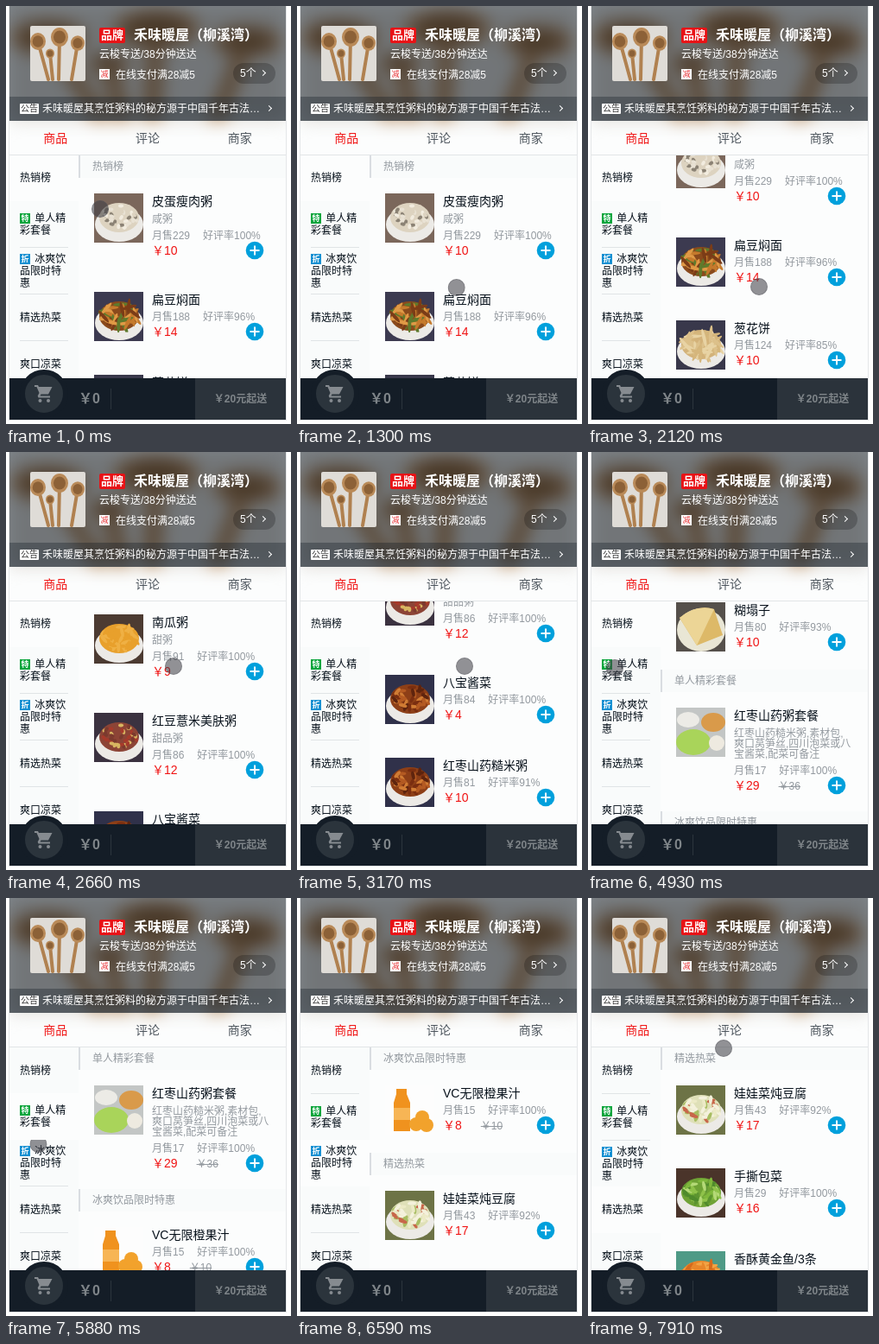
These frames come from a looping animation (330x484 px, 8000 ms). An HTML page:

```html
<!DOCTYPE html>
<html lang="zh-CN">
<head>
<meta charset="utf-8">
<title>外卖点餐</title>
<style>
* { box-sizing: border-box; margin: 0; padding: 0; }
html, body { width: 100%; height: 100%; overflow: hidden; background: #fff; }
body { font: 12px/14px "Liberation Sans", "Noto Sans CJK SC", "Noto Sans CJK", sans-serif; color: #07111b; }
#stage { position: relative; width: 330px; height: 484px; overflow: hidden; }
#stage > *, .at { position: absolute; white-space: nowrap; }
svg { display: block; }

.frame { left: 3px; top: 0; width: 322px; height: 480px; border: 1px solid #e4e6e8; border-top: 0; background: #fcfdfd; }
.backdrop { left: 4px; top: 0; width: 320px; height: 172px; overflow: hidden; }
.backdrop svg { position: absolute; top: -1px; width: 320px; height: 134px; filter: blur(10px); }
.header { left: 4px; top: 0; width: 320px; height: 133px; color: #fff; background: rgba(7,17,27,.5); }
.brand { left: 104px; top: 25px; width: 30px; height: 18px; line-height: 18px; border-radius: 2px; background: #e81216; font-size: 13px; font-weight: 700; text-align: center; }
.shop { left: 144px; top: 25px; font-size: 16px; line-height: 18px; font-weight: 700; }
.cut { left: 104px; top: 73px; width: 12px; height: 12px; background: #fff; color: #e8393c; font-size: 9px; line-height: 12px; text-align: center; }
.pill { left: 259px; top: 66px; width: 49px; height: 24px; border-radius: 12px; background: rgba(0,0,0,.22); line-height: 24px; padding-left: 8px; }
.notice { left: 0; top: 105px; width: 320px; height: 28px; line-height: 28px; background: rgba(7,17,27,.3); padding-left: 38px; }
.label { left: 12px; top: 8px; width: 22px; height: 12px; background: #fff; color: #333; font-size: 10px; line-height: 12px; text-align: center; border-radius: 1px; }
.arrow { width: 5px; height: 5px; border: solid #fff; border-width: 1.5px 1.5px 0 0; transform: rotate(45deg); }

.tabs { left: 4px; top: 133px; width: 320px; height: 40px; display: flex; border-bottom: 1px solid #e2e5e7; font-size: 14px; line-height: 40px; color: #4d555d; text-align: center; }
.tabs b { flex: 1; font-weight: 400; }
.tabs b:first-child { color: #f01414; }

.goods { left: 4px; top: 173px; width: 320px; height: 258px; overflow: hidden; }
.menu { left: 0; top: 0; width: 80px; height: 258px; background: #f9fbfb; }
.menu div { position: relative; height: 54px; padding: 0 12px; display: flex; align-items: center; white-space: normal; }
.menu div::after { content: ""; position: absolute; left: 12px; bottom: 0; width: 56px; height: 1px; background: #e0e4e6; }
.menu .on { margin-top: -1px; background: #fcfdfd; z-index: 1; }
.menu .on::after { display: none; }
.menu i { display: inline-block; width: 12px; height: 12px; margin: 1px 2px 0 0; vertical-align: top; color: #fff; font: 700 9px/12px "Noto Sans CJK SC", "Noto Sans CJK", sans-serif; text-align: center; }
.list { left: 80px; top: 0; width: 240px; }
.list h2 { height: 26px; padding-left: 14px; border-left: 2px solid #d9dde1; background: #f9fbfb; font-size: 12px; line-height: 26px; font-weight: 400; color: #93999f; }
.food { position: relative; margin: 18px; min-height: 60px; padding-left: 67px; white-space: normal; display: flow-root; }
.food + .food { margin-top: 36px; }
.pic { position: absolute; left: 0; top: 0; }
.food h3 { margin: 2px 0 8px; font-size: 14px; line-height: 14px; font-weight: 400; white-space: nowrap; }
.food p { color: #93999f; line-height: 12px; }
.food .desc { margin-bottom: 8px; }
.food .sold { line-height: 10px; white-space: nowrap; }
.sold span { margin-left: 15px; }
.price { position: relative; height: 24px; line-height: 24px; font-size: 14px; color: #f01414; }
.price s { margin-left: 22px; font-size: 12px; color: #93999f; }
.plus { position: absolute; right: 7px; top: 1px; }

.cart { left: 4px; top: 431px; width: 320px; height: 48px; background: #141d27; color: #7f8589; font-weight: 700; }
.ring { left: 12px; top: -10px; width: 56px; height: 56px; border-radius: 50%; background: #2b343c; border: 6px solid #141d27; }
.total { left: 80px; top: 12px; height: 24px; line-height: 24px; font-size: 16px; }
.bar { left: 117px; top: 12px; width: 1px; height: 24px; background: #2c353d; }
.pay { left: 215px; top: 0; width: 105px; height: 48px; line-height: 48px; background: #2b333b; text-align: center; }
#dot { left: -10px; top: -10px; width: 20px; height: 20px; border-radius: 50%; background: rgba(62,62,68,.56); border: 1px solid rgba(90,90,96,.35); }
</style>
</head>
<body>
<div id="stage">
  <div class="frame"></div>
  <div class="backdrop"><svg class="spoons" viewBox="0 0 64 64" preserveAspectRatio="none"></svg></div>
  <div class="header">
    <svg class="at spoons" style="left:24px;top:23px;border-radius:2px" width="64" height="64"></svg>
    <div class="at brand">品牌</div>
    <div class="at shop">禾味暖屋（柳溪湾）</div>
    <div class="at" style="left:104px;top:49px">云梭专送/38分钟送达</div>
    <div class="at cut">减</div>
    <div class="at" style="left:123px;top:73px">在线支付满28减5</div>
    <div class="at pill">5个<span class="at arrow" style="left:32px;top:9px"></span></div>
    <div class="at notice"><span class="at label">公告</span>禾味暖屋其烹饪粥料的秘方源于中国千年古法…<span class="at arrow" style="left:298px;top:11px"></span></div>
  </div>
  <div class="tabs"><b>商品</b><b>评论</b><b>商家</b></div>
  <div class="goods">
    <div class="at menu" id="menu"></div>
    <div class="at list" id="list"></div>
  </div>
  <div class="cart">
    <div class="at ring"><svg style="margin:10px" width="24" height="24" fill="#868b90"><path d="M1 2h4l1 2h15.500l-4.500 8.500H8.500l-1 2H19v2H5.500l-.8-2L6.500 11 3.500 4H1z"/><circle cx="7.500" cy="20" r="2"/><circle cx="17" cy="20" r="2"/></svg></div>
    <div class="at total">￥0</div>
    <div class="at bar"></div>
    <div class="at pay">￥20元起送</div>
  </div>
  <div id="dot"></div>
</div>
<script>
const byId = id => document.getElementById(id);
const ellipse = (x, y, rx, ry, fill, turn = 0) =>
  `<ellipse cx="${x}" cy="${y}" rx="${rx}" ry="${ry}" fill="${fill}" transform="rotate(${turn} ${x} ${y})"/>`;
const shape = (d, fill) => `<path d="${d}" fill="${fill}"/>`;

function seeded(seed) {
  return () => (seed = (seed * 16807) % 2147483647) / 2147483647;
}

// Pieces of food scattered over the mound in a bowl.
function scatter(long, colors) {
  const rnd = seeded(4242);
  return Array.from({ length: 40 }, (_, i) => {
    const a = rnd() * Math.PI * 2, r = Math.sqrt(rnd());
    return ellipse(29 + Math.cos(a) * r * 20, 28 + Math.sin(a) * r * 14, long, 2, colors[i % colors.length], rnd() * 180);
  }).join('');
}

const dish = (back, base, long, ...colors) =>
  [back, ellipse(29, 36, 28, 20, '#eceae6') + ellipse(29, 28, 23, 17, base) + scatter(long, colors)];
const stew = dish('#30314a', '#8d3f17', 5, '#b45a22', '#7a2e10', '#d07c34', '#5e240e');

const pics = {
  congee: dish('#7b675b', '#ddd3c0', 3, '#e9e2d4', '#f2ecdf', '#8b8274', '#ddd3c0'),
  noodles: dish('#3c3a50', '#8a4a1c', 9, '#c57a2c', '#5f7a2c', '#e09a46', '#7b3c17'),
  pancake: dish('#39384b', '#d3b27a', 11, '#e8d3a4', '#d5b67c', '#dcc08a'),
  pie: dish('#4a3d38', '#c08a45', 11, '#d5a35c', '#b57a38'),
  pumpkin: dish('#4c3b32', '#e8a02c', 6, '#e8a02c', '#efb044'),
  redbean: dish('#3b3240', '#8c4436', 3, '#a63a2b', '#d8b661', '#7b3a2e'),
  stew,
  folded: ['#55504b', ellipse(29, 32, 28, 25, '#e9e6d5') + shape('M4 18Q24 2 44 8L54 38 24 50z', '#ddb968') +
    shape('M4 18Q24 2 44 8L24 50z', '#ecd596')],
  combo: ['#c3c6c5', ellipse(14, 14, 13, 9, '#ecebe6') + ellipse(43, 17, 14, 11, '#d99a4a') +
    ellipse(20, 40, 20, 15, '#a9d45a') + ellipse(47, 41, 9, 9, '#eeeae0')],
  juice: ['#fdfdfd', shape('M13 4h12v6l4 10v33H10V20l3-10z', '#f0921e') + shape('M10 26h19v14H10z', '#f7b555') +
    [[36, 45], [48, 46], [43, 37]].map(([x, y]) => ellipse(x, y, 8, 8, '#f2a22c')).join('')],
  tofu: dish('#6d7346', '#dfe0b8', 5, '#f4f1dc', '#a8bd62', '#eceac6', '#f4f1dc', '#c8674a'),
  cabbage: dish('#4a342a', '#6fa235', 6, '#8fc24a', '#5c9430', '#b4d977', '#7fb83c', '#4f8a2c'),
  fish: dish('#4f9a86', '#e8862a', 8, '#e8862a', '#f2a445', '#d56a1c')
};

// name, picture, price, sold, rating, old price, description
const sections = [
  ['热销榜', [
    ['皮蛋瘦肉粥', 'congee', 10, 229, 100, 0, '咸粥'],
    ['扁豆焖面', 'noodles', 14, 188, 96],
    ['葱花饼', 'pancake', 10, 124, 85],
    ['牛肉馅饼', 'pie', 14, 114, 91],
    ['招牌猪肉白菜锅贴/10个', 'pie', 17, 101, 78],
    ['南瓜粥', 'pumpkin', 9, 91, 100, 0, '甜粥'],
    ['红豆薏米美肤粥', 'redbean', 12, 86, 100, 0, '甜品粥'],
    ['八宝酱菜', 'stew', 4, 84, 100],
    ['红枣山药糙米粥', 'stew', 10, 81, 91],
    ['糊塌子', 'folded', 10, 80, 93]]],
  ['单人精彩套餐', [
    ['红枣山药粥套餐', 'combo', 29, 17, 100, 36, '红枣山药糙米粥,素材包,爽口莴笋丝,四川泡菜或八宝酱菜,配菜可备注']], '特', '#0aa53c'],
  ['冰爽饮品限时特惠', [
    ['VC无限橙果汁', 'juice', 8, 15, 100, 10]], '折', '#1690d2'],
  ['精选热菜', [
    ['娃娃菜炖豆腐', 'tofu', 17, 43, 92],
    ['手撕包菜', 'cabbage', 16, 29, 100],
    ['香酥黄金鱼/3条', 'fish', 11, 15, 100]]],
  ['爽口凉菜', []]
];

const plus = `<svg class="plus" width="22" height="22"><circle cx="11" cy="11" r="10.300" fill="#00a0dc"/><path d="M5.500 11h11M11 5.500v11" stroke="#fff" stroke-width="2"/></svg>`;

function foodHtml([name, pic, price, sold, rating, old, desc]) {
  const [back, art] = pics[pic];
  return `<div class="food"><svg class="pic" width="57" height="57"><rect width="57" height="57" fill="${back}"/>${art}</svg>
    <h3>${name}</h3>${desc ? `<p class="desc">${desc}</p>` : ''}
    <p class="sold">月售${sold}<span>好评率${rating}%</span></p>
    <div class="price">￥${price}${old ? `<s>￥${old}</s>` : ''}${plus}</div></div>`;
}

byId('list').innerHTML = sections.filter(s => s[1].length)
  .map(([title, foods]) => `<h2>${title}</h2>` + foods.map(foodHtml).join('')).join('');
byId('menu').innerHTML = sections.map(([title, , tag, color]) =>
  `<div><span>${tag ? `<i style="background:${color}">${tag}</i> ` : ''}${title}</span></div>`).join('');

const spoon = (x, y, r, endX) =>
  `<path d="M${x} ${y}L${endX} 62" stroke="#b08150" stroke-width="4" stroke-linecap="round"/>` +
  ellipse(x, y, r, r * 1.1, '#b98a58') + ellipse(x, y, r * .7, r * .75, '#8c6137');
const spoons = '<rect width="64" height="64" fill="#dfdcd7"/>' +
  spoon(9, 18, 9, 21) + spoon(34, 13, 10, 33) + spoon(55, 20, 8, 48) + spoon(23, 32, 5, 26);
document.querySelectorAll('.spoons').forEach(el => el.innerHTML = spoons);

const LOOP = 8000, STEP = 132, LEAD = 30;
const linear = p => p;
const glide = p => p < 1 ? 1 - 2 ** (-10 * p) : 1;
const smooth = p => p * p * (3 - 2 * p);

// start, length, target, easing: drags, a fling, then three jumps from the menu
const scrollMoves = [
  [1320, 264, 63, linear], [2112, 132, 173, linear], [2244, 2840, 745, glide],
  [4827, 300, 1040, glide], [6290, 300, 1204, glide], [7220, 300, 1326, glide]];
// start, length, x, y
const dotMoves = [
  [0, 132, 110, 258], [132, 620, 191, 334], [752, 300, 185, 337], [1240, 330, 183, 263], [1750, 360, 198, 325],
  [2112, 300, 194, 248], [3200, 600, 31, 250], [5640, 280, 41, 304], [6620, 340, 43, 355], [7570, 340, 157, 174]];

const follow = (from, moves, t) => moves.reduce((at, [start, length, to, ease]) =>
  t <= start ? at : at + (to - at) * ease(Math.min(1, (t - start) / length)), from);
const dotX = dotMoves.map(([start, length, x]) => [start, length, x, smooth]);
const dotY = dotMoves.map(([start, length, , y]) => [start, length, y, smooth]);
const items = [...byId('menu').children];
const starts = [...document.querySelectorAll('.list h2')].map(el => el.offsetTop);

function draw(time) {
  const t = Math.floor((time + LEAD) / STEP) * STEP; // the picture moves in even ticks
  const y = Math.round(follow(0, scrollMoves, t));
  const active = starts.filter(s => s <= y).length - 1;
  byId('list').style.transform = `translateY(${-y}px)`;
  byId('dot').style.transform = `translate(${follow(109, dotX, t)}px, ${follow(235, dotY, t)}px)`;
  items.forEach((el, i) => el.classList.toggle('on', i === active));
}

const begin = performance.now();
function tick() {
  draw((performance.now() - begin) % LOOP);
  requestAnimationFrame(tick);
}
tick();
</script>
</body>
</html>
```
